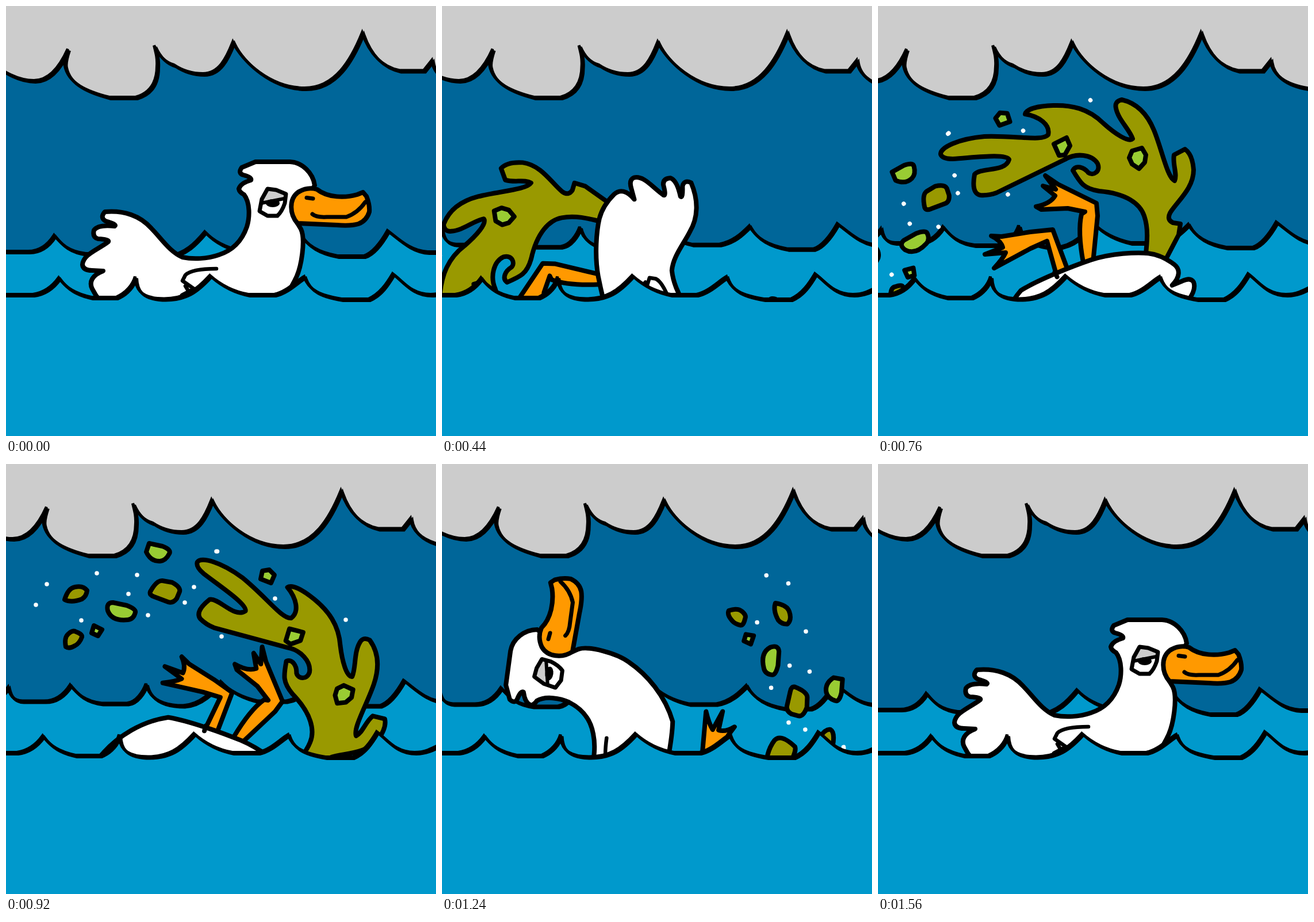
Write an HTML page that moves like this. It is 748 by 748 pixels and loops after 1.6 s.

```html
<!DOCTYPE html>
<html lang="en">
<head>
<meta charset="utf-8">
<title>Rolling duck</title>
<style>
  html, body { margin: 0; width: 100%; height: 100%; overflow: hidden; background: #ccc; }
  svg { display: block; width: 100vw; height: 100vh; }
  .ink { fill: none; stroke: #000; stroke-width: 8; stroke-linejoin: round; stroke-linecap: round; }
  .nib { fill: none; stroke: #000; stroke-width: 5; stroke-linejoin: miter; stroke-miterlimit: 3; }
  .deep { fill: #069; }
  .water { fill: #09c; }
  .white { fill: #fff; }
  .orange { fill: #f90; }
  .weed { fill: #990; }
  .leaf { fill: #9c3; }
</style>
</head>
<body>
<svg viewBox="0 0 748 748">
  <defs>
    <path id="topLine" d="M-30 92C-5 118 25 131 50 131C78 131 96 105 109 76C105 88 102 98 104 106C110 136 142 150 181 160H227C255 152 264 130 264 106C265 92 262 82 259 70C268 90 280 100 294 104C312 116 328 119 344 119C372 119 385 92 396 64C412 98 462 144 521 144C574 144 602 95 621 48C634 85 655 107 686 113.500H728L742 96C746 122 768 139 812 145"/>
    <path id="midLine" d="M-70 430C-45 428 -32 416 -23 404C-20 418 -14 427 2 428H40C62 428 76 414 85 400C98 416 110 428 140 432H184C200 430 212 412 217 398C222 420 240 436 282 436C312 434 332 412 347 394C362 410 385 422 412 428H460C484 424 500 408 512 396C524 418 545 430 578 436H624C642 430 656 408 665 392C684 406 705 428 735 429H790"/>
    <path id="frontLine" d="M-40 503H48C70 500 83 488 93 474C106 492 122 502 150 508H193C211 500 222 486 226 472C227 494 236 507 265 510C312 514 334 494 356 470C374 486 396 498 423 503H468C490 498 506 480 520 472C528 496 548 505 585 511H632C652 502 664 484 674 467C692 480 706 503 740 503C757 503 768 498 790 486"/>
  </defs>

  <g id="top">
    <path class="deep" d=""/>
    <use href="#topLine" class="nib" x="-1.500" y="-1.500"/>
    <use href="#topLine" class="nib" x="1.500" y="1.500"/>
  </g>
  <g id="mid">
    <path class="water" d=""/>
    <use href="#midLine" class="nib" x="-1.500" y="-1.500"/>
    <use href="#midLine" class="nib" x="1.500" y="1.500"/>
  </g>

  <g id="roll">
    <!-- weed and legs, laid out upside down -->
    <g class="ink" transform="rotate(-154.286 337.5 512.5)">
      <path class="weed" d="M500 442L523 398L526 379L513 377Q502 372 508 360C520 340 549 318 549 285Q547 258 534 249L515 259C512 275 521 292 516 304C503 298 494 250 480 216C466 182 446 168 424 163Q411 166 414 178C418 198 438 215 443 231C436 238 412 222 392 204C366 178 336 172 305 173C275 174 258 180 256 188C280 192 300 206 296 224C286 236 240 225 185 227C140 231 108 246 109 258Q112 266 130 266C165 264 222 256 228 267C222 290 178 280 168 293Q162 326 178 329Q192 330 206 325L325 267C345 255 372 258 382 274C388 288 374 296 366 290C358 280 344 276 339 286C352 308 358 318 385 322C432 326 456 344 463 365C471 388 468 412 465 440Z"/>
      <path class="leaf" d="M306 240L328 229L334 243L325 259L315 260Z"/>
      <path class="leaf" d="M437 264L442 252L459 247L466 259L464 272L454 283L442 275Z"/>
      <path class="orange" d="M374 446L382 365L380 343L313 310L291 295L309 319L287 313L308 330Q300 344 275 349L284 354L330 352L360 358L354 362Q347 392 357 446"/>
      <path class="orange" d="M334 470L304 389L265 393L215 401L197 400Q214 408 217 420L186 432L222 429Q217 440 202 456L265 422L294 409L311 470"/>
    </g>

    <!-- loose bits -->
    <g transform="rotate(-195.429 337.5 512.5)">
      <g class="ink">
        <path class="weed" d="M102 236Q108 216 120 214Q134 211 141 220Q140 230 132 235Q114 242 102 236Z"/>
        <path class="weed" d="M104 318Q101 302 108 296Q116 288 122 292Q133 296 132 301Q128 312 120 316Q110 322 104 318Z"/>
        <path class="weed" d="M251 222Q262 202 272 203L289 206Q304 214 302 222L297 234Q290 243 282 240L258 231Q249 228 251 222Z"/>
        <path class="leaf" d="M244 153L249 138L272 143Q288 149 284 156Q278 168 268 169Q252 170 244 153Z"/>
        <path class="leaf" d="M177 255Q174 241 186 241L210 246Q226 252 225 258Q222 270 212 271Q184 274 177 255Z"/>
        <path class="leaf" d="M149 294L153 281L167 288L160 299Z"/>
        <path class="leaf" d="M443 200L446 186L458 184L467 193L461 207Z"/>
      </g>
      <path fill="none" stroke="#fff" stroke-width="7.500" stroke-linecap="round" d="M71 209h0M52 245h0M158 190h0M131 272h0M228 193h0M213 226h0M247 263h0M327 214h0M311 241h0M366 152h1.500M375 300h0M468 234h0M591 271h0"/>
    </g>

    <!-- duck -->
    <g class="ink">
      <path class="white" d="M537 312C534 290 515 272 494 271H434L410 281Q403 291 413 294Q428 298 426 303Q408 308 405 318Q406 324 414 328C425 342 424 368 419 384C410 410 392 426 370 433C350 440 325 441 307 437C285 428 270 404 253 387C234 365 205 355 172 358Q163 368 173 374Q194 380 189 383Q160 380 153 390Q150 402 160 405Q180 406 178 410C160 424 134 432 133 450Q134 460 150 460L169 461C150 468 144 480 150 492C158 508 168 520 182 529C200 540 240 557 277 562C310 566 375 571 410 567C453 548 485 512 502 478C515 455 521 405 513 388L507 378L520 340Z"/>
      <path d="M343 570V561"/>
      <path stroke-width="6.500" d="M366 457C342 457 320 460 312 468L307 478L327 492L306 503L318 532M312 487L318 497"/>
      <path class="orange" d="M507 378C493 362 492 336 508 324Q524 314 541 319C560 334 590 334 611 328L621 324L627 331Q633 346 632 358Q627 374 613 379Q600 383 575 381Z"/>
      <path stroke-width="7" d="M533 362Q540 368 558 367H592Q612 360 625 341"/>
      <path stroke-width="7" d="M523 333.500L534 335"/>
      <path class="white" stroke="none" d="M455 318L487 326L485 343L471 365L448 363L441 356L445 336Z"/>
      <path fill="#ccc" stroke="none" d="M455 318L487 326L485 336L444 343Z"/>
      <path stroke-width="6" d="M444 343L484 335"/>
      <ellipse cx="464" cy="343" rx="12" ry="7" fill="#000" stroke="none"/>
      <path stroke-width="7" d="M455 318L470 320L487 327L485 343Q480 358 472 365L455 365L441 357L445 336Z"/>
    </g>
  </g>

  <g id="front">
    <path class="water" d=""/>
    <use href="#frontLine" class="nib" x="-1.500" y="-1.500"/>
    <use href="#frontLine" class="nib" x="1.500" y="1.500"/>
  </g>
</svg>
<script>
  const STEP = 40, STEPS = 40, TURN_AT = 4, PEAK = 19, LAST = 39;
  const el = id => document.getElementById(id);
  const layers = { top: el('top'), mid: el('mid'), front: el('front') };
  const roll = el('roll');

  // Each sea layer is its crest line filled down past the bottom edge.
  for (const [name, layer] of Object.entries(layers)) {
    const line = el(name + 'Line').getAttribute('d');
    layer.firstElementChild.setAttribute('d', line + 'V800H-80V100Z');
  }

  const shift = (layer, x, y = 0) => layer.setAttribute('transform', `translate(${x} ${y})`);

  function draw() {
    const i = Math.floor(performance.now() / STEP) % STEPS;
    const k = i <= PEAK ? i / PEAK : (LAST - i) / (LAST - PEAK);
    const slow = k * k, fast = 1 - (1 - k) ** 2;
    shift(layers.top, -58 * slow);
    shift(layers.mid, 29 * fast, -15 * fast);
    shift(layers.front, -29 * fast);
    const angle = 360 * Math.max(0, i - TURN_AT) / (LAST - TURN_AT);
    roll.setAttribute('transform', `rotate(${angle} 337.5 512.5)`);
    requestAnimationFrame(draw);
  }
  draw();
</script>
</body>
</html>
```
